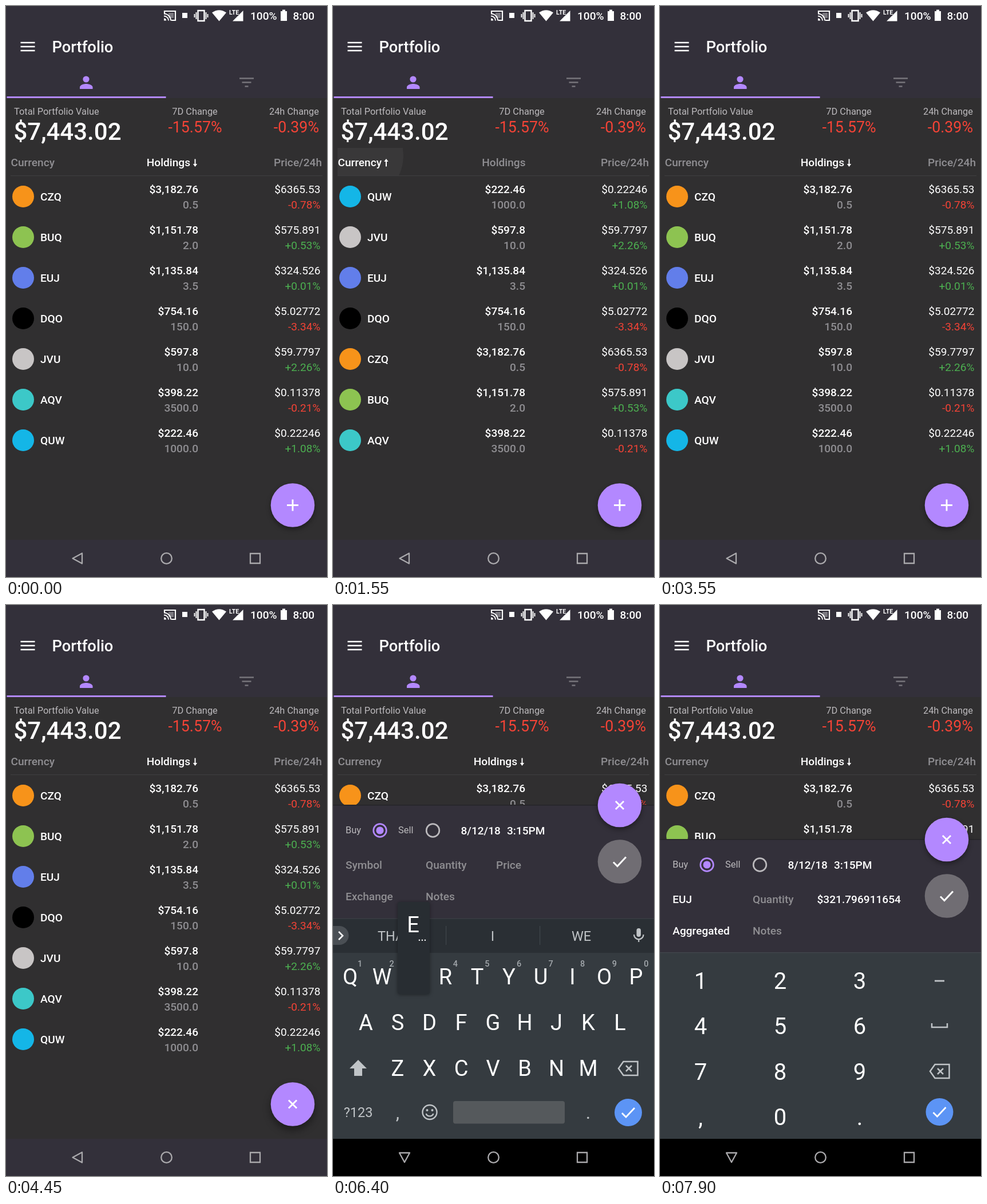
Animation, 561 px wide and 998 px high, one loop 8 s. Source, as an HTML page:

```html
<!DOCTYPE html>
<html lang="en">
<head>
<meta charset="utf-8">
<title>Portfolio</title>
<style>
html, body { margin: 0; width: 100%; height: 100%; overflow: hidden; background: #303030; }
svg { display: block; width: 561px; height: 998px; font-family: Roboto, "Liberation Sans", sans-serif; }
text { white-space: pre; }
.fab { filter: drop-shadow(0 4px 4px rgba(0, 0, 0, .38)); }
.fab.raised { filter: drop-shadow(0 7px 7px rgba(0, 0, 0, .42)); }
.popup { filter: drop-shadow(0 1px 3px rgba(0, 0, 0, .4)); }
</style>
</head>
<body>
<svg id="stage" viewBox="0 0 561 998"></svg>
<script>
const LOOP = 8000;
const WHITE = '#fff', GREY = '#8f8e92', SOFT = '#bbb9bc', BAR = '#33303a',
  BODY = '#302f30', PURPLE = '#b388ff', RED = '#f44336', GREEN = '#4caf50',
  BLUE = '#5c94f5', KEYS = '#353b40', STRIP = '#2a2f34', KEYTEXT = '#c0c4c7';

// ---- markup helpers ----
const text = (x, y, str, size = 19.1, fill = WHITE, weight = 500, anchor = 'start', extra = '') =>
  `<text x="${x}" y="${y}" font-size="${size}" fill="${fill}" font-weight="${weight}" text-anchor="${anchor}" ${extra}>${str}</text>`;
const rect = (x, y, w, h, fill, extra = '') =>
  `<rect x="${x}" y="${y}" width="${w}" height="${h}" fill="${fill}" ${extra}/>`;
const circle = (x, y, r, fill, extra = '') =>
  `<circle cx="${x}" cy="${y}" r="${r}" fill="${fill}" ${extra}/>`;
const shape = (d, fill, extra = '') => `<path d="${d}" fill="${fill}" ${extra}/>`;
const line = (d, stroke, w = 2.6, extra = '') =>
  `<path d="${d}" fill="none" stroke="${stroke}" stroke-width="${w}" ${extra}/>`;
const group = (id, inner, extra = '') => `<g id="${id}" ${extra}>${inner}</g>`;
const tick = (x, y, w = 3) => line(`M${x - 11} ${y + 1}l7 7l15 -16`, WHITE, w);

// ---- portfolio data: code, colour, value, amount, price, 24h change ----
const coins = [
  ['CZQ', '#f7931a', '3,182.76', '0.5', '6365.53', -0.78],
  ['BUQ', '#8dc351', '1,151.78', '2.0', '575.891', 0.53],
  ['EUJ', '#627eea', '1,135.84', '3.5', '324.526', 0.01],
  ['DQO', '#000', '754.16', '150.0', '5.02772', -3.34],
  ['JVU', '#c8c5c5', '597.8', '10.0', '59.7797', 2.26],
  ['AQV', '#3cc8c8', '398.22', '3500.0', '0.11378', -0.21],
  ['QUW', '#14b6e7', '222.46', '1000.0', '0.22246', 1.08],
];
const worth = c => parseFloat(c[2].replace(',', ''));
const compare = [
  (a, b) => a[0] < b[0] ? -1 : 1,
  (a, b) => worth(b) - worth(a),
  (a, b) => b[5] - a[5],
];

// Header taps: time, column, direction, touch x, first ripple radius
const taps = [
  [-1000, 1, 1, 290, 0],
  [50, 1, -1, 290, 0],
  [900, 0, 1, 45, 46],
  [1400, 0, -1, 45, 10],
  [1950, 1, 1, 290, 0],
  [2550, 2, 1, 505, 0],
  [3550, 1, 1, 290, 0],
];
const cells = [[8, 175], [175, 336], [390, 553]];

// Column titles: label, anchor, x idle, x active, arrow x
const heads = [
  ['Currency', 'start', 8.5, 8.5, 93],
  ['Holdings', 'end', 336.5, 322, 330.5],
  ['Price/24h', 'end', 552, 537.5, 546.5],
];

// Pressed keys: letter, time down, time up, key x, key y
const presses = [
  ['E', 6400, 6500, 141, 650],
  ['U', 6600, 6700, 363, 650],
  ['J', 6800, 6900, 391, 730],
];

// ---- static parts ----
const statusBar = () =>
  line('M277 13V9h19v16h-7', WHITE, 2.2) +
  line('M276 17.5a8 8 0 0 1 8 8M276 13.5a12 12 0 0 1 12 12', WHITE, 1.9) +
  shape('M276 21.5a4 4 0 0 1 4 4h-4z', WHITE) + rect(284, 12, 9, 9, WHITE, 'opacity=".35"') +
  rect(308, 12, 9, 9, WHITE) +
  line('M335.5 8h11v18h-11z', WHITE, 2.4) +
  line('M332.500 11v12M349.500 11v12M329.500 14v6M352.500 14v6', WHITE, 1.9) +
  shape('M360 11.500q12.500-8.500 25 0L372.500 26.500z', WHITE) +
  shape('M414.500 8v18.500h-18.500z', WHITE) +
  text(390, 15, 'LTE', 10.5, WHITE, 700) +
  text(427, 23.5, '100%') +
  shape('M480 9h3v-2.500h5v2.500h3v17h-11z', WHITE) +
  text(501.5, 23.5, '8:00');

const appBar = () =>
  rect(0, 0, 561, 161, BAR) + statusBar() +
  line('M25.500 64h25M25.500 71h25M25.500 78h25', WHITE, 2.7) +
  text(80.5, 81, 'Portfolio', 27.3) +
  circle(140, 128, 5.6, PURPLE) +
  shape('M129 145v-3c0-4 7-6 11-6s11.500 2 11.500 6v3z', PURPLE) +
  rect(1.5, 158, 278, 3, PURPLE) +
  line('M408 126.500h25M412.500 133.500h16M417.500 140.500h6', '#77747b', 2.7);

const summary = () =>
  text(14, 190, 'Total Portfolio Value', 16.4, SOFT, 400) +
  text(13.5, 234, '$7,443.02', 42) +
  text(330, 190, '7D Change', 16.4, SOFT, 400, 'middle') +
  text(330.5, 221, '-15.57%', 26.75, RED, 400, 'middle') +
  text(547, 190, '24h Change', 16.4, SOFT, 400, 'end') +
  text(547, 221, '-0.39%', 26.75, RED, 400, 'end') +
  rect(8, 296, 545, 1.2, '#3e3d3f');

const coinRow = ([code, colour, value, amount, price, change], i) => group('coin' + i,
  circle(30, 0, 19, colour) + text(60, 7, code) +
  text(336, -6, '$' + value, 19.1, WHITE, 500, 'end') +
  text(336, 21, amount, 19.1, GREY, 500, 'end') +
  text(549.5, -6, '$' + price, 19.1, WHITE, 400, 'end') +
  text(549.5, 21, (change > 0 ? '+' : '') + change.toFixed(2) + '%', 19.1, change > 0 ? GREEN : RED, 400, 'end'));

const header = () => heads.map(([label, anchor], i) =>
  text(0, 279.5, label, 19.1, GREY, 500, anchor, `id="head${i}"`)).join('') +
  group('arrow', line('M0 -6.500v11', WHITE, 2) + shape('M-3.700 2h7.400l-3.700 5z', WHITE));

// Drawn with its top edge at y = 0
const sheet = () =>
  rect(0, 0, 561, 600, BAR) + rect(0, -1, 561, 1.6, '#262528') +
  text(22, 49, 'Buy', 16.4, SOFT, 400) + text(114, 49, 'Sell', 16.4, SOFT, 400) +
  circle(82, 44, 11.3, 'none', `stroke="${PURPLE}" stroke-width="2.7"`) + circle(82, 44, 6.6, PURPLE) +
  circle(174.5, 44, 11.3, 'none', `stroke="${SOFT}" stroke-width="2.7"`) +
  text(223.5, 51, '8/12/18') + text(304, 51, '3:15PM') +
  text(22, 111, '', 19.1, GREY, 500, 'start', 'id="symbol"') +
  text(162, 111, 'Quantity', 19.1, GREY) +
  text(285, 111, '', 19.1, GREY, 500, 'start', 'id="price"') +
  text(22, 165.5, '', 19.1, GREY, 500, 'start', 'id="exchange"') +
  text(162, 165.5, 'Notes', 19.1, GREY) +
  rect(0, 96, 2.7, 17, '#448aff', 'id="cursor"') +
  circle(501, 98.5, 38.3, '#706d73') + tick(501, 98.5);

const fab = () =>
  circle(0, 0, 38.3, PURPLE, 'class="fab" id="fabDisc"') +
  group('cross', line('M-10 0h20M0 -10v20', WHITE, 2.9));

const eraser = (x, y) =>
  line(`M${x - 17} ${y}l8.500 -12h25v24h-25z`, KEYTEXT, 2.5) +
  line(`M${x - 4} ${y - 5}l10 10m0 -10l-10 10`, KEYTEXT, 2.5);

const letterRow = (letters, x0, y) => [...letters].map((c, i) =>
  text(x0 + 55.5 * i, y, c, 38, WHITE, 400, 'middle')).join('');

const letterPad = () =>
  rect(0, 548, 561, 60, STRIP) + rect(0, 547.5, 561, 1.2, '#3c4146') +
  shape('M0 561h11a16.500 16.500 0 0 1 0 33h-11z', '#4a4f54') +
  line('M10 571l7 7l-7 7', WHITE, 2.6) +
  [['THANKS', 124], ['I', 279], ['WE', 434]].map(([s, x]) =>
    text(x, 587, s, 23.5, KEYTEXT, 400, 'middle')).join('') +
  rect(197, 561, 1.2, 33, '#40464b') + rect(361, 561, 1.2, 33, '#40464b') +
  rect(530.5, 565, 7.5, 15, KEYTEXT, 'rx="3.700"') +
  line('M526 576a8.300 8.300 0 0 0 16.600 0M534.300 584v5', KEYTEXT, 2.2) +
  letterRow('QWERTYUIOP', 30, 663) +
  [...'1234567890'].map((c, i) => text(47 + 55.6 * i, 632, c, 14.5, '#a3a8ac', 500, 'middle')).join('') +
  letterRow('ASDFGHJKL', 57.500, 743) + letterRow('ZXCVBNM', 113, 823) +
  shape('M44 795l15 15h-8v13h-14v-13h-8z', KEYTEXT) + eraser(516, 810) +
  text(44, 895, '?123', 23.5, KEYTEXT, 400, 'middle') +
  text(113, 898, ',', 32, KEYTEXT, 400, 'middle') +
  circle(169, 886.5, 12.5, 'none', `stroke="${KEYTEXT}" stroke-width="2.4"`) +
  circle(164.5, 883, 2, KEYTEXT) + circle(173.5, 883, 2, KEYTEXT) +
  line('M162.500 889a7 7 0 0 0 13 0', KEYTEXT, 2.2) +
  rect(210, 867, 195, 39.5, '#55595c', 'rx="4"') +
  text(446, 898, '.', 32, KEYTEXT, 400, 'middle') +
  group('done', circle(516, 887, 24, BLUE) + tick(516, 887, 2.8));

const numberPad = () => rect(0, 607, 561, 1.2, '#44494e') +
  ['123', '456', '789', ',0.'].map((row, j) => [...row].map((c, i) =>
    text(71 + 139 * i, 671 + 79.3 * j, c, 40, WHITE, 400, 'middle')).join('')).join('') +
  line('M480 657h17', KEYTEXT, 2.8) + line('M475 731v7h27v-7', KEYTEXT, 2.5) +
  eraser(489, 815) + circle(488.5, 886, 24, BLUE) + tick(488.5, 886, 2.8);

const popup = () => rect(-28, -131, 56, 161, '#282d32', 'rx="4" class="popup"') +
  text(-1, -78, '', 38, WHITE, 400, 'middle', 'id="popLetter"') +
  text(15, -63, '...', 18, WHITE, 500, 'middle', 'id="popDots"');

const navBar = () => rect(0, 933, 561, 65, BAR, 'id="navBack"') +
  line('M-8.500 0L8 -9v18z', '#aaa9ac', 2.3, 'id="back" stroke-linejoin="round"') +
  circle(280.5, 965.5, 9.3, 'none', 'stroke="#aaa9ac" stroke-width="2.300"') +
  line('M427 957h17v17h-17z', '#aaa9ac', 2.3);

document.getElementById('stage').innerHTML =
  `<clipPath id="cell">${rect(0, 248, 0, 48, WHITE, 'id="cellBox"')}</clipPath>` +
  rect(0, 0, 561, 998, BODY) + appBar() + summary() +
  `<g clip-path="url(#cell)">${circle(0, 262, 0, WHITE, 'id="ripple"')}</g>` +
  header() + coins.map(coinRow).join('') +
  group('sheet', sheet()) + group('fab', fab()) +
  group('keyboard', rect(0, 607, 561, 330, KEYS) + group('letters', letterPad()) + group('numbers', numberPad())) +
  navBar() + group('popup', popup());

// ---- motion ----
const el = id => document.getElementById(id);
const set = (id, props) => { for (const k in props) el(id).setAttribute(k, props[k]); };
const show = (id, on) => set(id, { visibility: on ? 'visible' : 'hidden' });
const move = (id, x, y, turn = 0) => set(id, { transform: `translate(${x} ${y}) rotate(${turn})` });
const between = (t, a, b) => t >= a && t < b;
const ease = (t, start, length, from, to) => {
  const p = Math.min(1, Math.max(0, (t - start) / length));
  return from + (to - from) * (1 - (1 - p) ** 3);
};
const field = (id, value, hint) => {
  el(id).textContent = value || hint;
  set(id, { fill: value ? WHITE : GREY });
};

function drawTable(t) {
  const [start, column, dir, x, r0] = taps.filter(tap => tap[0] <= t).pop();
  heads.forEach((h, i) => {
    const on = i === column;
    set('head' + i, { x: h[on ? 3 : 2], fill: on ? WHITE : GREY });
  });
  move('arrow', heads[column][4], 274, dir > 0 ? 0 : 180);
  const sorted = [...coins].sort((a, b) => dir * compare[column](a, b));
  coins.forEach((c, i) => move('coin' + i, 0, 333 + 71 * sorted.indexOf(c)));

  const age = t - start, [left, right] = cells[column];
  set('cellBox', { x: left, width: right - left });
  set('ripple', { cx: x, r: r0 + age * .45, opacity: Math.max(0, .17 * (1 - age / 200)) });
}

function drawSheet(t) {
  let top = ease(t, 4470, 200, 933, 736);
  if (t >= 5550) top = ease(t, 5550, 300, 736, 350);
  if (t >= 7380) top = ease(t, 7380, 120, 350, 410);
  move('sheet', 0, top);
  show('sheet', t >= 4470);
  move('fab', 501, Math.min(872.5, top));
  move('cross', 0, 0, t >= 4450 ? 45 : 0);
  el('fabDisc').classList.toggle('raised', between(t, 4450, 4600));

  const typed = presses.filter(p => t >= p[2]).map(p => p[0]).join('');
  const filled = t >= 7400;
  field('symbol', typed, 'Symbol');
  field('price', filled && '$321.796911654', 'Price');
  set('price', { x: filled ? 274.5 : 285 });
  field('exchange', filled && 'Aggregated', 'Exchange');

  const inSymbol = between(t, 5500, 5950) || between(t, 6450, 7000);
  const inQuantity = between(t, 7400, 7900);
  show('cursor', inSymbol || inQuantity);
  const after = typed ? el('symbol').getComputedTextLength() + 1 : 0;
  set('cursor', { x: inQuantity ? 161.5 : 21.7 + after });
}

function drawKeyboard(t) {
  const up = t >= 5550, numeric = t >= 7380;
  show('keyboard', up);
  move('keyboard', 0, ease(t, 5550, 300, 386, 0));
  set('letters', { display: numeric ? 'none' : 'inline' });
  set('numbers', { display: numeric ? 'inline' : 'none' });
  set('done', { opacity: between(t, 7000, 7100) ? .75 : 1 });
  set('navBack', { fill: up ? '#000' : BAR });
  move('back', 125, 965.5, up ? -90 : 0);

  const press = presses.find(p => between(t, p[1], p[2]));
  set('popup', { display: press ? 'inline' : 'none' });
  if (press) {
    move('popup', press[3], press[4]);
    el('popLetter').textContent = press[0];
    set('popDots', { opacity: press[4] < 700 ? 1 : 0 });
  }
}

const begin = performance.now();
function frame() {
  const t = (performance.now() - begin) % LOOP;
  drawTable(t);
  drawSheet(t);
  drawKeyboard(t);
  requestAnimationFrame(frame);
}
frame();
</script>
</body>
</html>
```
